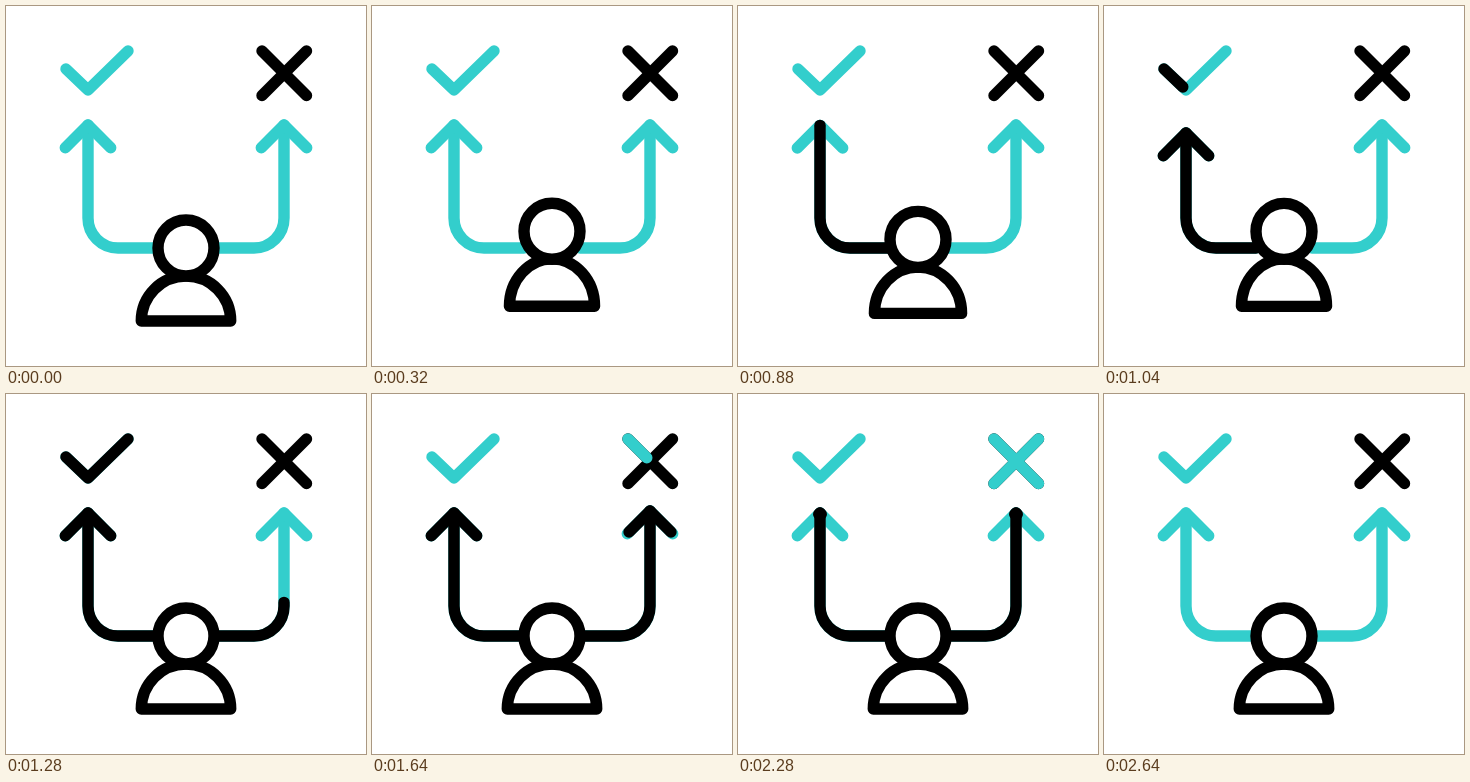
Animation, 360 px wide and 360 px high, one loop 3000 ms. Source, as an HTML page with a canvas:

```html
<!DOCTYPE html>
<html lang="en">
<head>
<meta charset="utf-8">
<title>Choice</title>
<style>
  html, body { margin: 0; width: 100%; height: 100%; overflow: hidden; background: #fff; }
  canvas { display: block; width: 360px; height: 360px; }
</style>
</head>
<body>
<canvas id="stage"></canvas>
<script>
const LOOP = 3000, TEAL = '#33cecc', BLACK = '#000';
const canvas = document.getElementById('stage');
const ctx = canvas.getContext('2d');
const dpr = window.devicePixelRatio || 1;
canvas.width = canvas.height = 360 * dpr;

const ease = x => (1 - Math.cos(Math.PI * x)) / 2;

// Value at time t through [time, value] stops, eased between them.
function at(t, stops) {
  if (t <= stops[0][0]) return stops[0][1];
  for (let i = 1; i < stops.length; i++) {
    const [t0, a] = stops[i - 1], [t1, b] = stops[i];
    if (t < t1) return a + (b - a) * ease((t - t0) / (t1 - t0));
  }
  return stops[stops.length - 1][1];
}

// Progress that draws in during a..b and withdraws during c..d.
const inOut = (t, a, b, c, d) => at(t, [[a, 0], [b, 1], [c, 1], [d, 0]]);

// Strokes the first part (0..1) of a path of the given length.
function trace(d, color, part = 1, length = 0) {
  if (part <= 0) return;
  ctx.setLineDash(part < 1 ? [Math.max(0.01, part * length), length * 2] : []);
  ctx.strokeStyle = color;
  ctx.stroke(new Path2D(d));
  ctx.setLineDash([]);
}

function arrow(mirrored, dip, stem, head) {
  ctx.save();
  if (mirrored) { ctx.translate(360, 0); ctx.scale(-1, 1); }
  const tip = 119 + dip;
  const shaft = `M152 242H112A30 30 0 0 1 82 212V${tip}`;
  const wings = s => `M${82 - 22.7 * s} ${tip + 22.7 * s}L82 ${tip}L${82 + 22.7 * s} ${tip + 22.7 * s}`;
  trace(shaft, TEAL);
  trace(wings(1), TEAL);
  trace(shaft, BLACK, stem, 180 - dip);
  if (head > 0) trace(wings(head), BLACK);
  ctx.restore();
}

function person(t) {
  const jump = at(t, [[120, 0], [340, 1], [620, 0], [740, 0], [1020, 1], [1240, 0]]);
  const squash = at(t, [[560, 0], [640, 1.5], [720, 1.5], [800, 0]]);
  const base = 315 - 15 * jump, half = 44.7 - 2.2 * jump;
  const rise = 45 + 2.5 * jump - squash;
  const headY = 242 - 17 * jump + squash;
  ctx.fillStyle = '#fff';
  for (const d of [
    `M${180 - half} ${base}A${half} ${rise} 0 0 1 ${180 + half} ${base}Z`,
    `M152 ${headY}a28 28 0 1 1 56 0a28 28 0 1 1 -56 0Z`
  ]) {
    ctx.fill(new Path2D(d));
    trace(d, BLACK);
  }
}

function draw(t) {
  ctx.setTransform(dpr, 0, 0, dpr, 0, 0);
  ctx.clearRect(0, 0, 360, 360);
  ctx.lineWidth = 11.4;
  ctx.lineCap = ctx.lineJoin = 'round';

  const check = 'M60 63L82 84L122 45';
  trace(check, TEAL);
  trace(check, BLACK, inOut(t, 960, 1180, 1380, 1600), 87);

  const strokes = ['M256 45L300.5 89.5', 'M300.5 45L256 89.5'];
  for (const d of strokes) trace(d, BLACK);
  strokes.forEach((d, i) => {
    const lag = i * 120;
    trace(d, TEAL, inOut(t, 1560 + lag, 1740 + lag, 2300 + lag, 2500 + lag), 63);
  });

  const dip = shift => at(t - shift, [[860, 0], [1020, 8], [1060, 8], [1120, -2], [1200, 0]]);
  arrow(false, dip(0), inOut(t, 360, 920, 2280, 2600), inOut(t, 880, 1030, 2120, 2310));
  arrow(true, dip(520), inOut(t, 1060, 1500, 2280, 2600), inOut(t, 1460, 1680, 2120, 2310));
  person(t);
}

const start = performance.now();
function tick() {
  draw((performance.now() - start) % LOOP);
  requestAnimationFrame(tick);
}
tick();
</script>
</body>
</html>
```
